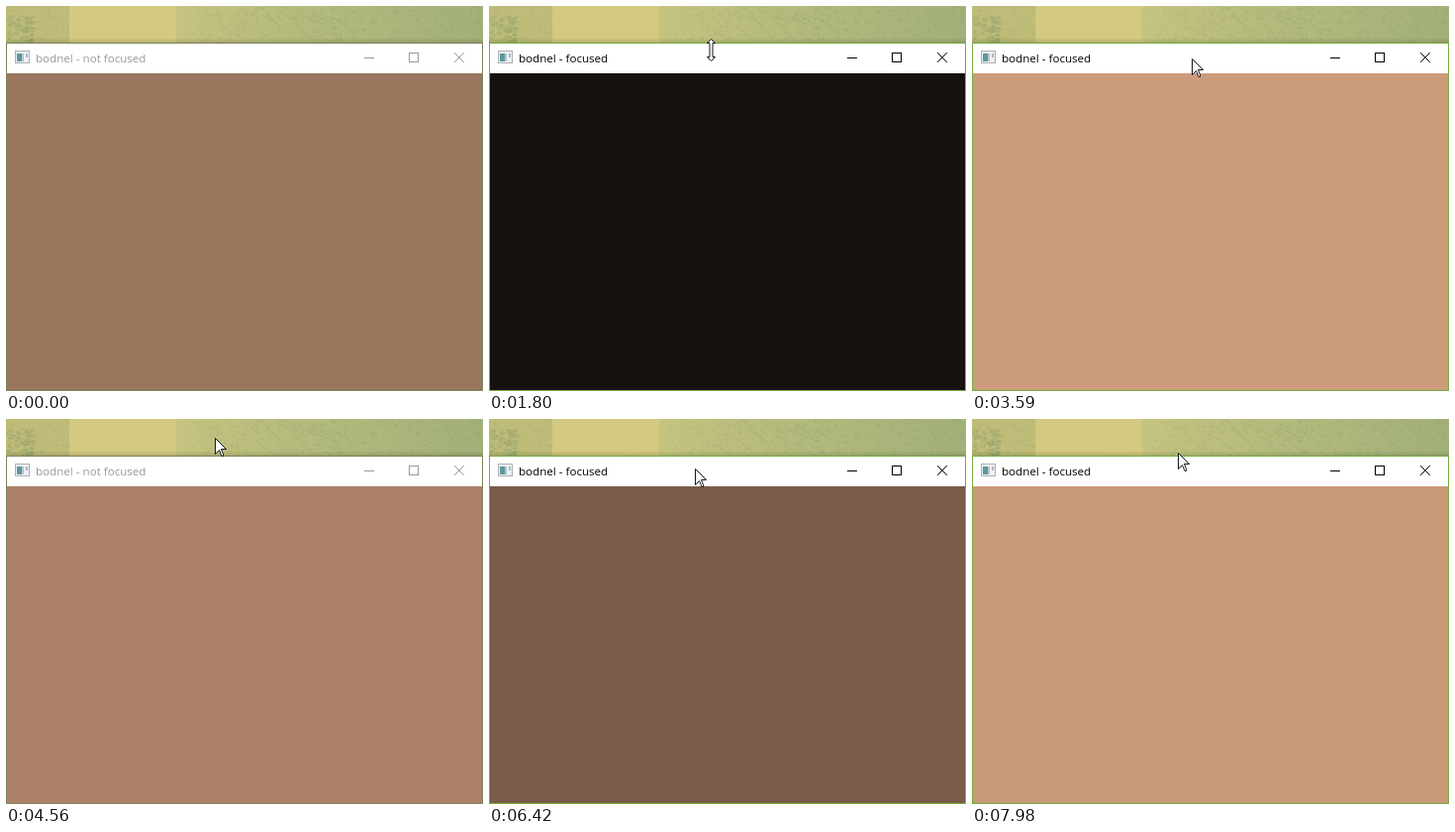
Write an HTML page with a canvas that moves like this. It is 482 px wide and 389 px high and loops after 8000 ms.

```html
<!DOCTYPE html>
<html lang="en">
<head>
<meta charset="utf-8">
<title>Focus fade</title>
<style>
  html, body { margin: 0; width: 482px; height: 389px; overflow: hidden; }
  body { position: relative; background: #b4b67b; }
  canvas, svg, #win, #shade, #bar, #body, #title { position: absolute; left: 0; top: 0; }
  #shade { top: 32px; width: 482px; height: 5px; background: linear-gradient(#3a402000, #3a402030); }
  #win { top: 37px; width: 482px; height: 352px; background: #7d8358; }
  #bar { left: 1px; top: 38px; width: 480px; height: 30px; background: #fff; }
  #body { left: 1px; top: 68px; width: 480px; height: 320px; }
  #title { left: 30px; top: 44px; font: 11.6px/17px "Open Sans", "Noto Sans", sans-serif; white-space: pre; color: #999; }
  #ui { color: #999; }
  .on #win { background: #74ad3c; }
  .on #title, .on #ui { color: #000; }
</style>
</head>
<body>
<canvas id="paper" width="482" height="38"></canvas>
<div id="shade"></div>
<div id="win"></div>
<div id="bar"></div>
<div id="body"></div>
<div id="title"></div>
<svg id="ui" width="482" height="389" shape-rendering="crispEdges">
  <rect x="9.5" y="45.5" width="14" height="12" fill="#eef0f1" stroke="#adb0b2"/>
  <rect x="11" y="48" width="5" height="8" fill="#5b999c"/>
  <rect x="16" y="48" width="2" height="8" fill="#b9c4cf"/>
  <rect x="20" y="48" width="2" height="4" fill="#a9b7cc"/>
  <g fill="none" stroke="currentColor">
    <path d="M362 52.5h10M407.5 47.5h9v9h-9z"/>
    <path d="M453.5 47.5l9 9M462.5 47.5l-9 9" stroke-linecap="square" shape-rendering="auto"/>
  </g>
</svg>
<svg width="482" height="389">
  <g id="cursor" fill="#fff" stroke="#15151f">
    <path id="arrow" d="M.5.5V16.5L4.5 12.5 7 18.5H8.5V16.5L6.5 11.5H11.5Z"/>
    <path id="sizer" d="M-.5-11.5 3.5-7.5H1V6.5H3.5L-.5 10.5-4.5 6.5H-2V-7.5H-4.5Z"/>
  </g>
</svg>
<script>
const LOOP = 8000;
const $ = id => document.getElementById(id);
const mix = (a, b, p) => a + (b - a) * p;
const stepped = (age, step) => Math.floor(age / step) * step;

// Exponential fades, seen in steps and held after their span.
const fades = [
  { at: 0, from: 155, goal: 0, tau: 418, step: 50, span: 830 },
  { at: 1750, from: 21, goal: 230, tau: 462, step: 72, span: 970, on: true },
  { at: 4430, from: 204, goal: 0, tau: 420, step: 74, span: 740 },
  { at: 6140, from: 35, goal: 230, tau: 485, step: 70, span: 920, on: true }
];

// Each move runs from where the last one stopped.
const entry = { x: 507, y: 414 };
const moves = [
  { at: 230, span: 600, x: 255, y: 90 },
  { at: 830, span: 460, x: 225, y: 39 },
  { at: 1420, span: 130, x: 225, y: 45 },
  { at: 2160, span: 280, x: 224, y: 54 },
  { at: 3540, span: 50, x: 222, y: 53 },
  { at: 3590, span: 690, x: 211, y: 19 },
  { at: 5350, span: 530, x: 208, y: 50 },
  { at: 7750, span: 230, x: 208, y: 34 }
];

function pointer(t) {
  const i = moves.findLastIndex(m => m.at <= t);
  if (i < 0) return entry;
  const to = moves[i], from = moves[i - 1] || entry;
  const age = t - to.at;
  const p = age < to.span ? stepped(age, 50) / to.span : 1;
  const ease = p * (2 - p);
  return { x: Math.round(mix(from.x, to.x, ease)), y: Math.round(mix(from.y, to.y, ease)) };
}

function drawPaper() {
  const g = $('paper').getContext('2d');
  let seed = 7;
  const rnd = () => (seed = seed * 16807 % 2147483647) / 2147483647;

  const fill = g.createLinearGradient(172, 0, 482, 0);
  fill.addColorStop(0, '#c5c37f');
  fill.addColorStop(.4, '#b6bb7d');
  fill.addColorStop(1, '#a2b079');
  g.fillStyle = fill;
  g.fillRect(172, 0, 310, 38);
  g.fillStyle = '#bfbc79';
  g.fillRect(0, 0, 64, 38);
  g.fillStyle = '#d3c981';
  g.fillRect(64, 0, 108, 38);

  const foliage = (n, x, y, w, h, color) => {
    g.fillStyle = color;
    while (n--) g.fillRect(x + rnd() * w | 0, y + rnd() * h | 0, 1 + rnd() * 3, 1 + rnd() * 2);
  };
  foliage(150, 0, 10, 28, 28, '#8fa06a48');
  foliage(80, 0, 0, 64, 38, '#a2a76a38');
  foliage(260, 180, 0, 160, 38, '#96a56d2c');
  foliage(240, 325, 0, 157, 38, '#869d6b2c');

  g.strokeStyle = '#899b6838';
  for (let i = 0; i < 24; i++) {
    const x = 225 + rnd() * 110, y = rnd() * 30;
    g.beginPath();
    g.moveTo(x, y);
    g.quadraticCurveTo(x + 9, y + 2, x + 12 + rnd() * 14, y + 6 + rnd() * 14);
    g.stroke();
  }
}

function render(t) {
  const fade = fades.findLast(f => f.at <= t);
  const age = Math.min(stepped(t - fade.at, fade.step), fade.span);
  const v = mix(fade.goal, fade.from, Math.exp(-age / fade.tau));
  $('body').style.background = `rgb(${v}, ${v * .75 + 2}, ${v * .59 + 3})`;
  document.body.className = fade.on ? 'on' : '';
  $('title').textContent = 'bodnel - ' + (fade.on ? 'focused' : 'not focused');

  const { x, y } = pointer(t);
  const onEdge = y >= 38 && y <= 46;
  $('arrow').style.display = onEdge ? 'none' : '';
  $('sizer').style.display = onEdge ? '' : 'none';
  $('cursor').setAttribute('transform', `translate(${x} ${y})`);
}

drawPaper();
const begin = performance.now();
function loop() {
  render((performance.now() - begin) % LOOP);
  requestAnimationFrame(loop);
}
loop();
</script>
</body>
</html>
```
